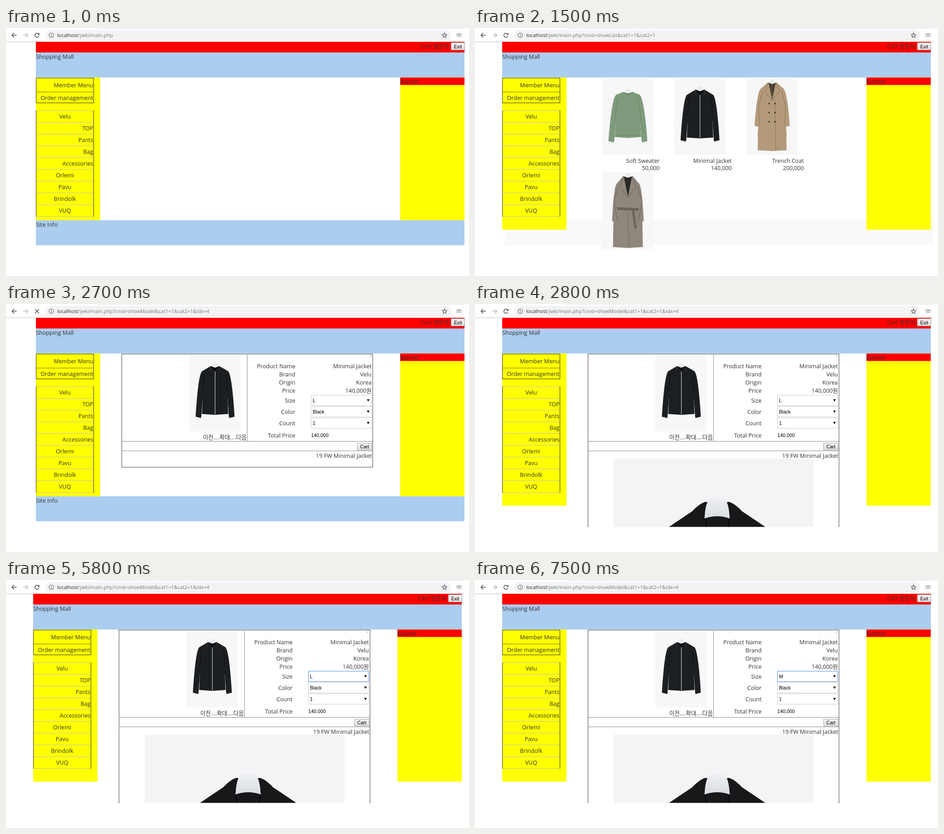
These frames come from a looping animation (1022 by 548 pixels, 8 s). An HTML page with a canvas:

```html
<!DOCTYPE html>
<html lang="ko">
<head>
<meta charset="utf-8">
<title>Shopping Mall</title>
<style>
html, body { margin: 0; width: 100%; height: 100%; overflow: hidden; background: #fff; }
canvas { display: block; width: 1022px; height: 548px; }
</style>
</head>
<body>
<canvas id="stage"></canvas>
<script>
const W = 1022, H = 548, LOOP = 8000;
const canvas = document.getElementById('stage');
const ratio = window.devicePixelRatio || 1;
canvas.width = W * ratio;
canvas.height = H * ratio;
const c = canvas.getContext('2d');

const PAGE = "12.6px 'Open Sans', 'Noto Sans CJK KR', 'Noto Sans CJK', sans-serif";
const FORM = "10.6px 'Liberation Sans', Arial, sans-serif";
const ADDR = "11px 'Open Sans', sans-serif";
const INK = '#333', BLUE = '#abcdef', YELLOW = '#ff0', RED = '#f00';

function box(x, y, w, h, color) {
  c.fillStyle = color;
  c.fillRect(x, y, w, h);
}

function frame(x, y, w, h, color) {
  c.strokeStyle = color;
  c.lineWidth = 1;
  c.strokeRect(x + 0.5, y + 0.5, w - 1, h - 1);
}

// y is the middle of the capital letters
function text(str, x, y, align = 'left', font = PAGE, color = INK) {
  c.font = font;
  c.textAlign = align;
  c.fillStyle = color;
  c.fillText(str, x, y + (font === PAGE ? 4.5 : 4));
}

function line(x1, y1, x2, y2, color, width = 1) {
  c.beginPath();
  c.moveTo(x1, y1);
  c.lineTo(x2, y2);
  c.strokeStyle = color;
  c.lineWidth = width;
  c.stroke();
}

function triangle(x1, y1, x2, y2, x3, y3, color) {
  c.beginPath();
  c.moveTo(x1, y1);
  c.lineTo(x2, y2);
  c.lineTo(x3, y3);
  c.fillStyle = color;
  c.fill();
}

function disc(x, y, r, color) {
  c.beginPath();
  c.arc(x, y, r, 0, 7);
  c.fillStyle = color;
  c.fill();
}

function ring(x, y, r, color, width, from = 0, to = 7) {
  c.beginPath();
  c.arc(x, y, r, from, to);
  c.strokeStyle = color;
  c.lineWidth = width;
  c.stroke();
}

function mirrored(draw) {
  for (const side of [-1, 1]) {
    c.save();
    c.scale(side, 1);
    draw(side);
    c.restore();
  }
}

// A coat, jacket or sweater around x = 0, from a few body measures
function garment({ top, neck, shoulder: [sx, sy], cuff: [cx, cy], hem: [hx, hy], fill, seam, lining, open }) {
  c.beginPath();
  c.ellipse(0, top + 1, 7, 8, 0, 0, 7);
  c.fillStyle = '#e9ebee';
  c.fill();
  mirrored(() => {
    c.beginPath();
    c.moveTo(-0.5, top + 5);
    c.lineTo(neck, top);
    c.lineTo(sx, sy);
    c.quadraticCurveTo((sx + cx) / 2 + 1.5, sy + 4, cx, cy);
    c.lineTo(cx - 12, cy + 3);
    c.lineTo(hx - 2, sy + 40);
    c.lineTo(hx, hy);
    c.lineTo(-0.5, hy + 2);
    c.fillStyle = fill;
    c.fill();
    line(sx - 3, sy + 7, hx - 2, sy + 40, seam);
    line(hx - 2, sy + 40, cx - 12, cy, seam);
    triangle(-0.5, top + 4, neck - 1, top + 1, -0.5, top + open, lining);
    if (open > 20) {
      triangle(neck, top, neck * 1.8, top + open / 2, 0, top + open, fill);
      line(neck * 1.8, top + open / 2, 0, top + open, seam);
      line(neck, top, neck * 1.8, top + open / 2, seam);
    }
  });
}

function sweater() {
  garment({ top: 30, neck: 10, shoulder: [25, 36], cuff: [43, 139], hem: [29, 130],
    fill: '#7f9a7c', seam: '#66825f', lining: '#63805f', open: 8 });
  line(-29, 126, 29, 126, '#66825f');
}

function jacket() {
  garment({ top: 25, neck: 9, shoulder: [28, 36], cuff: [43, 137], hem: [29, 131],
    fill: '#1c1f22', seam: '#0a0b0c', lining: '#0a0b0c', open: 13 });
  mirrored(() => line(9, 27, 11, 36, '#3a3d40'));
  line(0, 37, 0, 132, '#c9cbcd', 1.2);
}

function trench() {
  mirrored(() => line(28, 104, 30, 128, '#97805f', 4));
  garment({ top: 9, neck: 9, shoulder: [24, 22], cuff: [39, 105], hem: [32, 159],
    fill: '#b29a7a', seam: '#8a7253', lining: '#4b3f31', open: 40 });
  line(6, 49, 8, 160, '#8a7253');
  for (let y = 56; y < 100; y += 20) mirrored(() => disc(6.5, y, 1.7, '#382d22'));
}

function wrapCoat() {
  garment({ top: 8, neck: 10, shoulder: [24, 24], cuff: [35, 108], hem: [33, 165],
    fill: '#8f867c', seam: '#665e56', lining: '#292827', open: 48 });
  line(-24, 80, 24, 82, '#6c635b', 6);
  line(11, 82, 17, 124, '#6c635b', 5);
  line(-1, 86, 3, 166, '#6b625a');
}

function photo(x, y, draw) {
  box(x, y, 113.5, 169.5, '#f7f7f8');
  c.save();
  c.translate(x + 57.5, y);
  draw();
  c.restore();
}

function bigPhoto() {
  c.save();
  c.beginPath();
  c.rect(306, 342, 441, 150.5);
  c.clip();
  box(306, 342, 441, 151, '#f4f3f5');
  c.translate(534.5, 0);
  mirrored(() => {
    c.beginPath();
    c.moveTo(-1, 493);
    c.lineTo(-1, 445);
    c.lineTo(25, 437);
    c.quadraticCurveTo(38, 440, 55, 458);
    c.lineTo(107, 493);
    c.fillStyle = '#17181a';
    c.fill();
    line(29, 462, 24, 493, '#08090a', 2);
  });
  const g = c.createLinearGradient(0, 429, 0, 475);
  g.addColorStop(0, '#eef0f3');
  g.addColorStop(1, '#d8dbe0');
  mirrored(() => {
    c.beginPath();
    c.moveTo(-0.5, 429);
    c.bezierCurveTo(18, 428, 25, 432, 28, 474);
    c.quadraticCurveTo(14, 469, -0.5, 469);
    c.fillStyle = g;
    c.fill();
  });
  c.restore();
}

function button(label, x, y, w, h) {
  const g = c.createLinearGradient(0, y, 0, y + h);
  g.addColorStop(0, '#f7f7f7');
  g.addColorStop(1, '#dddddd');
  box(x, y, w, h, g);
  frame(x, y, w, h, '#a3a3a3');
  text(label, x + w / 2, y + h / 2, 'center', FORM, '#000');
}

function select(value, x, y, focused) {
  box(x, y, 134, 24, '#fff');
  frame(x, y, 134, 24, focused ? '#4a8fe8' : '#ccc');
  text(value, x + 4, y + 12, 'left', FORM, '#000');
  triangle(x + 123.5, y + 9.5, x + 129.5, y + 9.5, x + 126.5, y + 14.5, '#000');
}

function dropdown(items, active, x, y) {
  const h = items.length * 13 + 2;
  box(x, y, 134, h, '#fff');
  items.forEach((item, i) => {
    const top = y + 1 + i * 13, on = i === active;
    if (on) box(x + 1, top, 132, 13, '#1e90ff');
    text(item, x + 4, top + 5.6, 'left', FORM, on ? '#fff' : '#000');
  });
  frame(x, y, 134, h, '#8a8ea6');
}

function arrow(tip, dir, color) {
  line(tip, 16, tip - dir * 10.5, 16, color, 1.6);
  for (const dy of [-5, 5]) line(tip, 16, tip - dir * 5, 16 + dy, color, 1.6);
}

function star(x, y) {
  c.beginPath();
  for (let i = 0; i < 10; i++) {
    const a = i * Math.PI / 5, r = i % 2 ? 2.5 : 5.6;
    c.lineTo(x + r * Math.sin(a), y - r * Math.cos(a));
  }
  c.closePath();
  c.strokeStyle = '#4f5357';
  c.lineWidth = 1.1;
  c.stroke();
}

function browser(query, loading) {
  const dark = '#4f5357';
  box(200, 0, 812, 1, '#dee1e6');
  box(0, 30, 1012, 1, '#c6c6c6');
  c.beginPath();
  c.roundRect(87, 4, 895, 24, 12);
  c.fillStyle = '#f1f3f4';
  c.fill();
  arrow(13, -1, dark);
  arrow(48.5, 1, '#bcbec0');
  if (loading) {
    for (const d of [-4.5, 4.5]) line(68.5 - d, 11.5, 68.5 + d, 20.5, dark, 1.6);
  } else {
    ring(68.3, 16, 4.5, dark, 1.6, 0.4, 5.5);
    triangle(73.8, 10.5, 73.8, 15.3, 69, 15.3, dark);
  }
  ring(100, 16, 5, '#5f6368', 1.1);
  box(99.4, 15, 1.2, 4, '#5f6368');
  box(99.4, 12.8, 1.2, 1.2, '#5f6368');
  text('localhost', 113, 16, 'left', ADDR, '#25282b');
  const w = c.measureText('localhost').width;
  text('/jwki/main.php' + query, 113 + w, 16, 'left', ADDR, '#75787c');
  star(968, 16.4);
  frame(995, 12, 10, 7, '#888b8f');
  box(998, 14, 4, 2, '#777');
}

const MENU = ['Velu', 'TOP', 'Pants', 'Bag', 'Accessories', 'Orlemi', 'Pavu', 'Brindolk', 'VUQ'];
const WIDE = 946, SIDE = 141.9, TOP = 109.4;

function mall(x, tall) {
  const height = (tall ? 445.6 : 424.8) - TOP, banner = x + WIDE - SIDE;
  box(x, 30.6, WIDE, 24, RED);
  text('Cart 방문자', x + 912, 40, 'right');
  button('Exit', x + 916, 32, 31, 17);
  box(x, 54.2, WIDE, 55.2, BLUE);
  text('Shopping Mall', x, 63);
  box(x, TOP, SIDE, height, YELLOW);
  box(banner, TOP, SIDE, height, YELLOW);
  box(banner, TOP, SIDE, 16.5, RED);
  text('Banner', banner, 118.5);

  frame(x, 110, 128, 56, INK);
  box(x, 141, 128, 1, '#77772a');
  text('Member Menu', x + 126.5, 126.5, 'right');
  text('Order management', x + 126.5, 154, 'right');

  for (let i = 0; i <= MENU.length; i++) box(x, 182 + i * 26, 128, 1, '#c4c4b4');
  box(x, 182, 1, 235, INK);
  box(x + 127, 182, 1, 235, INK);
  MENU.forEach((name, i) => {
    const right = i > 0 && i < 5;
    text(name, x + (right ? 126.5 : 64), 195.5 + i * 26, right ? 'right' : 'center');
  });
  if (!tall) {
    box(x, 424.8, WIDE, 55.2, BLUE);
    text('Site Info', x, 434);
  }
}

function listPage() {
  box(66, 425, WIDE, 55, '#f9f9f9');
  mall(60, true);
  [['Soft Sweater', '50,000', sweater], ['Minimal Jacket', '140,000', jacket], ['Trench Coat', '200,000', trench]]
    .forEach(([name, price, draw], i) => {
      const x = 280 + i * 159.2;
      photo(x, 111, draw);
      text(name, x + 127.5, 293, 'right');
      text(price, x + 127.5, 309.5, 'right');
    });
  photo(280, 319, wrapCoat);
}

function detailPage(x, tall, size, focus) {
  mall(x, tall);
  const left = x + 189, right = x + 743, bottom = tall ? 493 : 360;
  for (const edge of [left, right]) box(edge, 110, 1, bottom - 110, '#444');
  box(left, 110, 554, 1, '#444');
  box(x + 466, 110, 1, 193, '#888');
  for (const y of [303, 324]) box(left, y, 554, 1, '#888');
  if (!tall) box(left, 360, 555, 1, '#444');

  photo(x + 338, 112, jacket);
  text('이전....확대....다음', x + 465, 294, 'right');
  text('`', x + 741.5, 119, 'right');
  [['Product Name', 'Minimal Jacket'], ['Brand', MENU[0]], ['Origin', 'Korea'], ['Price', '140,000원']]
    .forEach(([label, value], i) => {
      text(label, x + 572.5, 137.5 + i * 18, 'right');
      text(value, x + 741, 137.5 + i * 18, 'right');
    });
  [['Size', size], ['Color', 'Black'], ['Count', '1']].forEach(([label, value], i) => {
    const y = Math.round(201 + i * 25.2);
    text(label, x + 572.5, y + 12.5, 'right');
    select(value, x + 607, y, focus === label);
  });
  text('Total Price', x + 572.5, 290, 'right');
  text('140,000', x + 607.5, 290, 'left', FORM, '#000');
  button('Cart', x + 709, 307, 33, 16);
  text('19 FW Minimal Jacket', x + 742, 335, 'right');
  if (tall) bigPhoto();
}

function render(t) {
  c.setTransform(ratio, 0, 0, ratio, 0, 0);
  box(0, 0, W, H, '#fff');
  if (t < 1500) {
    browser('', t >= 1200);
    mall(66, false);
    return;
  }
  if (t < 2700) {
    browser('?cmd=showList&cat1=1&cat2=1', t >= 2600);
    listPage();
    return;
  }
  const loading = t < 2800;
  browser('?cmd=showModel&cat1=1&cat2=1&idx=4', loading);
  if (loading) {
    detailPage(66, false, 'L', '');
    return;
  }
  const focus = t < 4100 ? '' : t < 5800 ? 'Color' : 'Size';
  detailPage(60, true, t < 7500 ? 'L' : 'M', focus);
  if (t >= 4300 && t < 5800) {
    const white = t >= 4800 && t < 5100;
    dropdown(['Black', 'White'], white ? 1 : 0, 667, 250);
  } else if (t >= 6000 && t < 7500) {
    const medium = t >= 6600 && t < 6900 || t >= 7100;
    dropdown(['L', 'M', 'S'], medium ? 1 : 0, 667, 225);
  }
}

const start = performance.now();
function tick(now) {
  render(Math.max(0, now - start) % LOOP);
  requestAnimationFrame(tick);
}
render(0);
requestAnimationFrame(tick);
</script>
</body>
</html>
```
